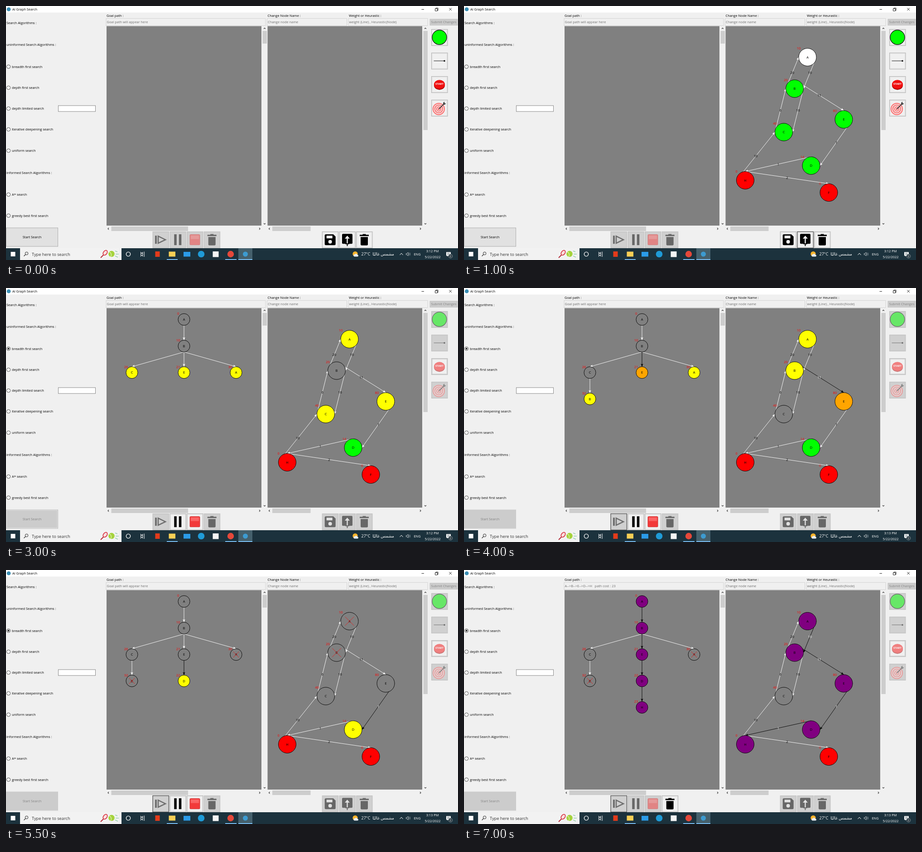
Animation, 998 px wide and 561 px high, one loop 7500 ms. Source, as an HTML page:

```html
<!DOCTYPE html>
<html lang="en">
<head>
<meta charset="utf-8">
<title>AI Graph Search</title>
<style>
html, body { margin: 0; width: 100%; height: 100%; overflow: hidden; background: #f0f0f0; }
svg { display: block; width: 998px; height: 561px; }
text { font-family: "Open Sans", "Noto Sans", "DejaVu Sans", sans-serif; white-space: pre; }
</style>
</head>
<body>
<svg id="stage" viewBox="0 0 998 561" xmlns="http://www.w3.org/2000/svg"></svg>
<script>
const STEP = 500, LOOP = 7500;

// Node states: w start, g plain, r goal, y queued, o visiting, x explored, X rejected, p on path
const FILL = { w: '#fff', g: '#0f0', r: '#f00', y: '#ff0', o: '#ffa500', x: '#808080', X: '#808080', p: '#800080' };

const NODES = {
  A: [758.5, 113, 10], B: [730, 182.5, 20], C: [706, 278.5, 40], D: [766.5, 352.5, 14],
  E: [838.5, 250.5, 80], F: [805.5, 412, 0], H: [621, 385, 0]
};
const SIDE = { L: [-1, 0], R: [1, 0], T: [0, -1] };
// from, to, side left, side reached, weight
const EDGES = [
  'B A L L 20', 'A B R R 10', 'C B L L 6', 'B C R R 16', 'B E T T 11',
  'E D R R 1', 'H C L L 10', 'D H T T 1', 'H F T T 2'
].map(s => s.split(' '));

// name, x, y, cost, parent index
const TREE = [
  ['A', 393, 69.5, 0, -1], ['B', 393, 128.3, 10, 0], ['C', 278, 186.8, 26, 1], ['E', 393, 186.8, 21, 1],
  ['A', 508, 186.8, 30, 1], ['B', 278, 245, 32, 2], ['D', 393, 245, 22, 3], ['H', 393, 303.5, 23, 6]
];

// graph states (A B C D E F H), black graph edges, tree states, black tree branches
const SHOW = [
  ['', '', '', ''],
  ['', '', '', ''],
  ['wggggrr', '', '', ''],
  ['wggggrr', '', '', ''],
  ['wggggrr', '', '', ''],
  ['xogggrr', 'AB', 'xo', '1'],
  ['yxygyrr', '', 'xxyyy', ''],
  ['yxogyrr', 'BC', 'xxoyy', '2'],
  ['yyxgorr', 'BE', 'xxxoyy', '3'],
  ['oyxyxrr', 'BA', 'xxxxoyy', '4'],
  ['Xoxyxrr', 'CB', 'xxxxXoy', '5'],
  ['XXxyxrr', 'ED', 'xxxxXXy', '6'],
  ['XXxoxrr', 'ED', 'xxxxXXo', '6'],
  ['XXxxxry', 'DH', 'xxxxXXxy', '7'],
  ['ppxpprp', 'AB BE ED DH', 'ppxpXXpp', '1367']
];

const text = (x, y, s, o = {}) =>
  `<text x="${x}" y="${y + (o.size || 7.4) * .36}" font-size="${o.size || 7.4}" fill="${o.fill || '#000'}" ` +
  `text-anchor="${o.at || 'start'}" font-weight="${o.weight || 400}">${s}</text>`;
const mid = (x, y, s, o) => text(x, y, s, { at: 'middle', ...o });
const rect = (x, y, w, h, fill, stroke = 'none', more = '') =>
  `<rect x="${x}" y="${y}" width="${w}" height="${h}" fill="${fill}" stroke="${stroke}" ${more}/>`;
const circle = (x, y, r, fill, stroke = 'none', w = 1) =>
  `<circle cx="${x}" cy="${y}" r="${r}" fill="${fill}" stroke="${stroke}" stroke-width="${w}"/>`;
const path = (d, stroke, w = 1, fill = 'none') =>
  `<path d="${d}" stroke="${stroke}" stroke-width="${w}" fill="${fill}"/>`;
const at = (x, y, s, opacity = 1) => `<g transform="translate(${x} ${y})" opacity="${opacity}">${s}</g>`;

function arrow(x1, y1, x2, y2, color) {
  const turn = Math.atan2(y2 - y1, x2 - x1) * 180 / Math.PI;
  return path(`M${x1} ${y1}L${x2} ${y2}`, color, .9) +
    `<path d="M0 0L-6.5 -2.6L-5 0L-6.5 2.6Z" fill="${color}" transform="translate(${x2} ${y2}) rotate(${turn})"/>`;
}

function node(x, y, r, name, state) {
  const k = r * .5;
  return circle(x, y, r, FILL[state], '#000', .9) + mid(x, y, name) +
    (state === 'X' ? path(`M${x - k} ${y - k}l${2 * k} ${2 * k}m0 ${-2 * k}l${-2 * k} ${2 * k}`, '#e02020', .9) : '');
}
const cost = (x, y, r, n) => mid(x - r, y - r + .3, n, { fill: '#f00' });

function graph(states, hot) {
  if (!states) return '';
  const names = Object.keys(NODES), black = hot.split(' ');
  let lines = '', labels = '', dots = '';
  for (const [a, b, s, e, w] of EDGES) {
    const on = black.includes(a + b), end = (n, d) => [NODES[n][0] + 19.5 * SIDE[d][0], NODES[n][1] + 19.5 * SIDE[d][1]];
    const p = end(a, s), q = end(b, e);
    lines += arrow(...p, ...q, on ? '#000' : '#fff');
    labels += mid((p[0] + q[0]) / 2, (p[1] + q[1]) / 2, w, { fill: on ? '#fff' : '#000' });
  }
  names.forEach((n, i) => {
    const [x, y, h] = NODES[n];
    dots += node(x, y, 19.5, n, states[i]) + cost(x, y, 19.5, h);
  });
  return lines + labels + dots;
}

function tree(states, hot) {
  let lines = '', dots = '';
  [...states].forEach((s, i) => {
    const [name, x, y, c, up] = TREE[i];
    if (up >= 0) lines += arrow(TREE[up][1], TREE[up][2] + 13, x, y - 13, hot.includes(i) ? '#000' : '#fff');
    dots += node(x, y, 13, name, s) + cost(x, y, 13, c);
  });
  return lines + dots;
}

// Icons are drawn around 0,0
const ICON = {
  play: rect(-12.5, -9, 4, 18, '#111') + path('M-5.5 -7.8V7.8L10.5 0Z', '#111', 2.6),
  pause: rect(-8, -12, 5.5, 24, '#000') + rect(2.5, -12, 5.5, 24, '#000'),
  stop: rect(-11, -11.5, 22, 23, '#f23a3a', '#c62828', 'stroke-width=".8" rx="1.5"') + rect(-9, -9.5, 18, 8, '#fa6464'),
  trash: path('M-10 -9.5H10', '#000', 3) + rect(-3.5, -12.5, 7, 3, '#000') +
    path('M-8 -6H8V10Q8 12.5 5.5 12.5H-5.5Q-8 12.5 -8 10Z', 'none', 0, '#000'),
  save: path('M-9.5 -12H7L12 -7V9.5Q12 12 9.5 12H-9.5Q-12 12 -12 9.5V-9.5Q-12 -12 -9.5 -12Z', 'none', 0, '#000') +
    rect(-8, -9, 13, 6, '#f2f2f2') + circle(0, 4.5, 4, '#f2f2f2'),
  load: rect(-11.5, -13, 23, 22, '#000', 'none', 'rx="2"') + path('M0 9V-6', '#f2f2f2', 2.4) +
    path('M-5.5 -2.5L0 -9L5.5 -2.5Z', 'none', 0, '#f2f2f2') + path('M0 9V14M-4 9H4', '#000', 2),
  node: circle(0, 0, 16, '#0f0', '#000', 1.2),
  line: path('M-12.5 0H11', '#000', .9) + circle(11, 0, 1.7, '#000'),
  start: '<ellipse cy="2" rx="12" ry="10" fill="#a80000"/><ellipse rx="12" ry="10" fill="#f01010"/>' +
    mid(0, -1.3, 'START', { size: 6, fill: '#fff', weight: 700 }),
  goal: [13.5, 9.6, 5.6].map(r => circle(-1.5, 2.2, r, '#ff6b6b') + circle(-1.5, 2.2, r - 2, '#f0e4e4')).join('') +
    circle(-1.5, 2.2, 2, '#ff5252') + path('M-1 2L9 -8', '#444', 2) + path('M7.5 -6.5L8.5 -12L11 -14L11.5 -10.5L14.5 -10L12 -7.5Z', 'none', 0, '#444')
};

function button(x, y, icon, on, focus, white) {
  const back = rect(x + .5, y + .5, 35.5, 36, on ? '#e1e1e1' : '#ccc', focus ? '#555' : on ? '#b4b4b4' : '#c2c2c2', `stroke-width="${focus ? 1.3 : 1}"`);
  const face = rect(x + 2.5, y + 2.5, 31.5, 32, on || white ? '#f0f0f0' : '#d0d0d0');
  return back + face + at(x + 18, y + 18.2, ICON[icon], on ? 1 : .5);
}

const CHEVRON = { up: 'M-2 1L0 -1L2 1', down: 'M-2 -1L0 1L2 -1', left: 'M1 -2L-1 0L1 2', right: 'M-1 -2L1 0L-1 2' };
const chevron = (x, y, dir, color = '#444') => at(x, y, path(CHEVRON[dir], color, 1.2));

function pane(x, w, vLen, hLen) {
  const v = x + w + 7;
  return rect(x, 44.5, w, 440.5, '#808080') +
    chevron(v, 49.5, 'up') + chevron(v, 481, 'down') + rect(v - 4.5, 55, 9.5, vLen, '#cdcdcd') +
    chevron(x + 4, 492, 'left') + chevron(x + w - 4, 492, 'right') + rect(x + 10.5, 487, hLen, 10, '#cdcdcd');
}

const field = (x, w, s) => rect(x + .5, 27.5, w, 16, '#f0f0f0', '#d4d4d4') + text(x + 2, 35.8, s, { fill: '#6d6d6d' });

const RADIOS = [
  [134, 'breadth first search'], [180.5, 'depth first search'], [226.5, 'depth limited search'],
  [272.5, 'iterative deepening search'], [319.5, 'uniform search'], [416.5, 'A* search'], [463, 'greedy best first search']
];

function taskbar(step) {
  const white = { fill: '#fff' }, small = { fill: '#fff', size: 7.4 };
  return rect(0, 535, 998, 26, '#1c323d') + rect(31, 535, 224, 26, '#f2f2f2') +
    rect(10.5, 543, 10, 10, '#fff') +
    circle(45.5, 546.5, 3.2, 'none', '#222') + path('M43 549L39.5 552.5', '#222', 1.1) +
    text(57, 548.2, 'Type here to search', { size: 9.25, fill: '#333' }) +
    '<ellipse cx="219" cy="545" rx="4" ry="6" transform="rotate(35 219 545)" fill="#f7dede" stroke="#d82e3c" stroke-width="1.6"/>' +
    path('M215 550L209 556', '#b52a38', 2) + circle(233, 547.5, 6.8, '#a5d33c') + path('M228 543Q235 547 231 554', '#eef8cf', 1.1) +
    path('M241 541l5 2m-4 5h7m-8 4l6 3', '#9bd0b0', 1.5) +
    circle(270, 548, 4.6, 'none', '#fff', 1.4) +
    path('M297.5 543v2.2h5v-2.2M297.5 553.5v-2.2h5v2.2M297.5 546.5h5v3.4h-5zM305.5 542.5v11.5', '#fff', .9) +
    rect(329.5, 542, 10, 12, '#e23b1b') + rect(359.5, 542.5, 14.5, 11, '#f8cf55') +
    rect(392, 543, 15, 10.5, '#2b9be8') + circle(431, 548, 7.3, '#1f9bd7') + rect(456.5, 542, 13, 12.5, '#f5f5f5') +
    rect(513, 535, 31, 26, '#45606c') + circle(496, 548, 7.2, '#e5483a') + circle(528.5, 548, 5.5, '#3d9bd0') +
    rect(355, 559, 24, 2, '#76b9ed') + rect(484, 559, 25, 2, '#76b9ed') + rect(513, 559, 31, 2, '#76b9ed') +
    circle(771, 547.5, 5.6, '#fbb42c') + path('M769 553.5a2.6 2.6 0 0 1 1 -5a3.5 3.5 0 0 1 6 1a2 2 0 0 1 0 4z', 'none', 0, '#e6edf4') +
    text(784.5, 548, '27°C', { ...white, size: 9 }) + mid(833, 548, 'مشمس غالبًا', { ...white, size: 9 }) +
    path('M869.5 550L873 546L876.5 550', '#fff', 1) +
    path('M883.5 546.5h2l2.5 -2.5v8l-2.5 -2.5h-2z', '#fff', .7) + path('M889.5 546q1.5 2 0 4M891.3 544.5q2.5 3.5 0 7', '#aebac0', .8) +
    text(900.5, 548, 'ENG', small) + mid(941.5, 541.5, step < 8 ? '3:12 PM' : '3:13 PM', small) + mid(942, 554.3, '5/22/2022', small) +
    path('M972 543.5h10v8h-6l-2 2v-2h-2z', 'none', 0, '#fff') + path('M974 546h6m-6 2.5h6', '#1c323d', .7) +
    circle(981.5, 552.5, 4.4, '#34434b', '#aab4b9', .6) + mid(981.5, 552.5, '1', { ...white, size: 6 });
}

function startButton(step) {
  const run = step >= 5;
  const [fill, edge] = run ? ['#ccc', step < 7 ? '#b8b8b8' : '#ccc'] : step === 4 ? ['#e5f1fb', '#0078d7'] : ['#e1e1e1', '#adadad'];
  return rect(.5, 490, 114, 41, fill, edge) +
    (run && step < 7 ? rect(1.5, 491, 112, 39, 'none', '#e4e4e4') : '') +
    mid(57.5, 510.3, 'Start Search', { fill: run ? '#838383' : '#000' });
}

function scene(step) {
  const [g, gHot, t, tHot] = SHOW[step];
  const run = step >= 5, done = step === 14, busy = run && !done;
  let s = rect(0, 0, 998, 561, '#f0f0f0') + rect(0, 0, 998, 14.5, '#fff');
  s += circle(6, 7.3, 4.3, '#3b8fb5') + text(14, 7.5, 'AI Graph Search', { size: 7.35 });
  s += path('M917.5 7.5H923M947.5 6h5v5h-5zM949 6v-1.5h5v5h-1.5M978.5 4.5l5.5 5.5m0 -5.5l-5.5 5.5', '#111', .9);

  s += text(1, 37.5, 'Search Algorithms :') + text(1, 85.8, 'uninformed Search Algorithms :') + text(1, 368.3, 'informed Search Algorithms :');
  RADIOS.forEach(([y, label], i) => {
    s += circle(5.5, y, 4, '#fff', '#333', .9) + text(13, y + .2, label);
    if (!i && step >= 3) s += circle(5.5, y, 2.1, '#222');
  });
  if (step === 3 || step === 4) s += rect(12.5, 128.5, 66, 11, 'none', '#333', 'stroke-width=".8" stroke-dasharray="1 1"');
  s += rect(115.5, 220, 82, 13, '#fff', '#8a8a8a') + startButton(step);

  s += text(222, 21.5, 'Goal path :') + text(577.5, 21.5, 'Change Node Name :') + text(757, 21.5, 'Weight or Heurastic :');
  s += field(220.5, 352, done ? 'A--&gt;B--&gt;E--&gt;D--&gt;H   path cost : 23' : 'Goal path will appear here');
  s += field(576, 176, 'Change node name') + field(755.5, 175, 'weight (Line) , Heurastic(Node)');
  s += rect(936, 29, 61, 13.5, '#ccc', '#c2c2c2') + mid(966.5, 35.8, 'Submit Changes', { fill: '#838383' });

  s += pane(222, 342, 28, 169.5) + pane(577.5, 341.5, 219, 84.5) + tree(t, tHot) + graph(g, gHot);

  s += button(323.5, 498, 'play', false, step >= 7) + button(361.3, 498, 'pause', busy) +
    button(399, 498, 'stop', busy, false, false) + button(436.7, 498, 'trash', done);
  s += button(697.7, 498, 'save', !run) + button(735.5, 498, 'load', !run, step === 1 || step === 2) + button(773, 498, 'trash', !run);
  ['node', 'line', 'start', 'goal'].forEach((n, i) => {
    s += button(939, 51 + 52 * i, n, !run, false, n === 'start');
  });
  return s + taskbar(step);
}

const stage = document.getElementById('stage');
const begin = performance.now();
let shown = -1;
function tick() {
  const step = Math.floor((performance.now() - begin) % LOOP / STEP);
  if (step !== shown) stage.innerHTML = scene(shown = step);
  requestAnimationFrame(tick);
}
tick();
</script>
</body>
</html>
```
